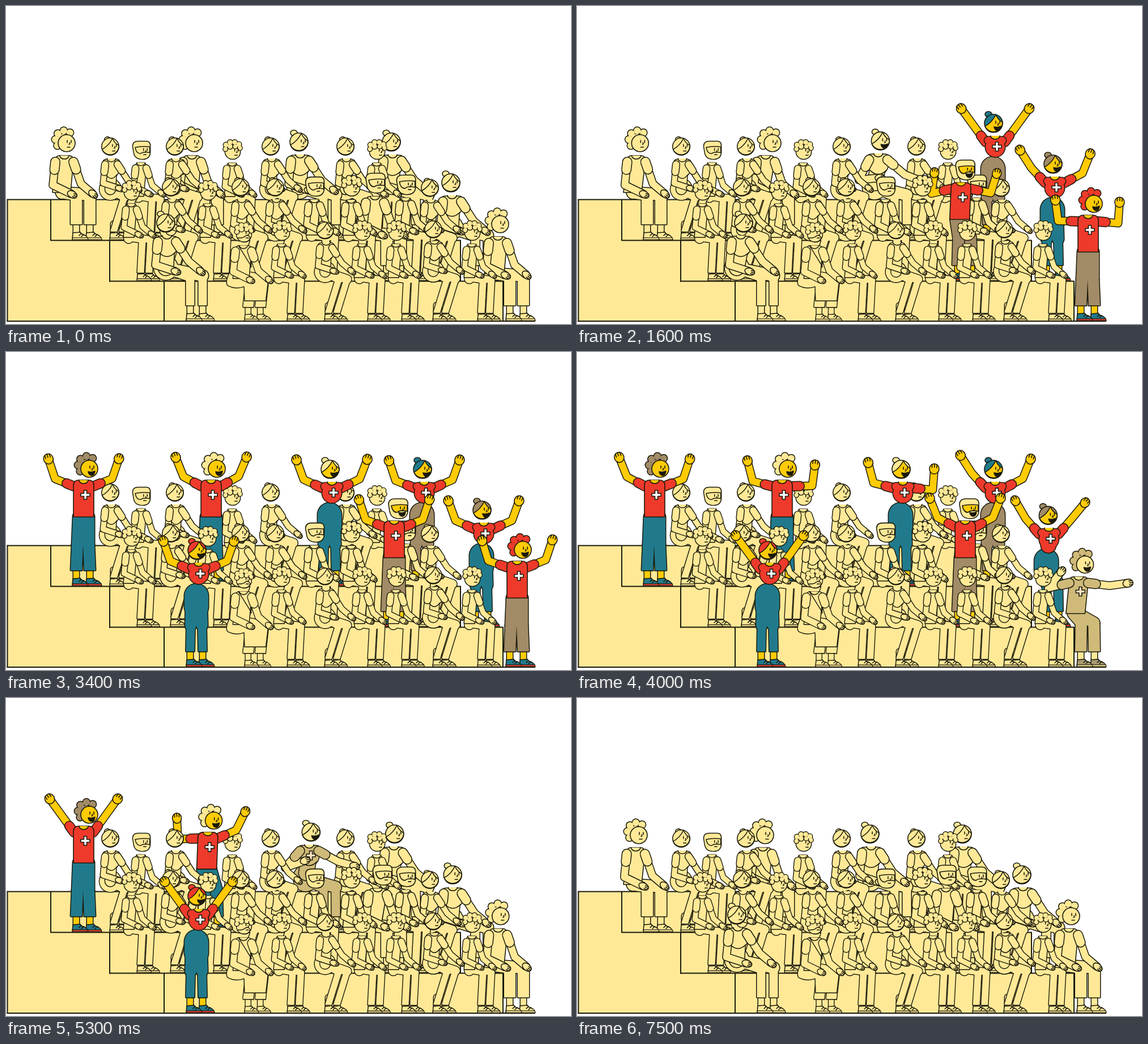
An HTML page with a canvas that plays this animation: 997x561 px, repeating every 7600 ms.

```html
<!DOCTYPE html>
<html lang="en">
<head>
<meta charset="utf-8">
<title>Cheering stand</title>
<style>
html, body { margin: 0; width: 100%; height: 100%; overflow: hidden; background: #fff; }
canvas { display: block; }
</style>
</head>
<body>
<canvas id="stage" width="997" height="561"></canvas>
<script>
const c = document.getElementById('stage').getContext('2d');
const INK = '#1b1a0c', PALE = '#ffe997', TAN = '#cfba79', GOLD = '#ffcb05';
const RED = '#ee3a2b', TEAL = '#217a8c', TAUPE = '#a28b67';
const LOOP = 7600, RISE = 700, SIT = 800;
const FLOORS = [413, 485, 556];
const BEATS = [1600, 2700, 4000, 5300];

// kind: b bun, c short curls, C big curls, g beard, r old man in a coat
const seated = [
  'b184,249 g239,255 b298,249 c400,256 b467,249 b599,249 c655,256',
  'c222,328 b291,321 c357,328 b414,321 b475,321 g545,319 c610,320 g706,316 b748,322',
  'r420,402 c487,399 b563,397 c629,399 c689,399 b754,395 c823,399'
].map(row => row.split(' ').map(s => {
  const [x, y] = s.slice(1).split(',').map(Number);
  return { kind: s[0], x, y };
}));

// arms: how far each arm is bent (0-9) at each beat, left and right
const fan = (row, kind, base, up, down, hair, pants, arms) =>
  ({ row, kind, base, up, down, hair, pants, arms, x: base - (kind === 'b' ? 53 : 31) });
const fans = [
  fan(0, 'C', 136, 1800, 5850, TAUPE, TEAL, ['0040', '0050']),
  fan(0, 'C', 361, 1600, 5070, PALE, TEAL, ['9968', '9984']),
  fan(0, 'b', 571, 1430, 4740, PALE, TEAL, ['3360', '3390']),
  fan(0, 'b', 734, 850, 3980, TEAL, TAUPE, ['0310', '0440']),
  fan(1, 'g', 684, 1130, 4450, PALE, TAUPE, ['9040', '9040']),
  fan(1, 'b', 839, 820, 3770, TAUPE, TEAL, ['1900', '4900']),
  fan(2, 'b', 336, 1600, 5400, RED, TEAL, ['8800', '8800']),
  fan(2, 'C', 901, 800, 3560, RED, TAUPE, ['8000', '9500'])
];
const rows = FLOORS.map((_, i) =>
  [...seated[i], ...fans.filter(f => f.row === i)].sort((a, b) => b.x - a.x));

const clamp = v => Math.max(0, Math.min(1, v));
const mix = (a, b, u) => a + (b - a) * u;
const smooth = v => { v = clamp(v); return v * v * (3 - 2 * v); };
const polar = ([x, y], deg, r) => {
  const a = deg * Math.PI / 180;
  return [x + r * Math.cos(a), y + r * Math.sin(a)];
};

function shape(d, fill) {
  const p = new Path2D(d);
  c.lineWidth = 1.6;
  c.strokeStyle = INK;
  if (fill) { c.fillStyle = fill; c.fill(p); }
  c.stroke(p);
}

function oval(x, y, rx, ry, fill, to = 2 * Math.PI) {
  c.beginPath();
  c.ellipse(x, y, rx, ry, 0, 0, to);
  c.lineWidth = 1.6;
  c.strokeStyle = INK;
  c.fillStyle = fill;
  c.fill();
  c.stroke();
}

// Merged thick lines with one outline; a negative width gives square ends
function limbs(fill, ...list) {
  for (const outer of [true, false]) {
    c.strokeStyle = outer ? INK : fill;
    for (const [w, ...p] of list) {
      c.lineCap = w < 0 ? 'butt' : 'round';
      c.lineWidth = Math.abs(w) + (outer ? 3 : 0);
      c.beginPath();
      c.moveTo(p[0], p[1]);
      for (let i = 0; i < p.length; i += 2) c.lineTo(p[i], p[i + 1]);
      c.stroke();
    }
  }
  c.lineCap = 'round';
}

function head(kind, x, y, hair, skin, happy, small) {
  c.save();
  c.translate(x, y);
  if (kind === 'b') {
    oval(small ? -5 : -9, small ? -13 : -16, 6, 5, hair);
    oval(0, 0, 16, 16, hair);
    shape('M-15 5Q-2-2 4-15.5Q8-6 15.8-2A16 16 0 0 1-15 5Z', skin);
  } else if (kind === 'g') {
    shape('M-17-8Q-17-18-6-18H9Q18-18 17-7V4Q16 17 2 17Q-13 17-15 4Z', hair);
    shape('M-12-6Q2-9 16-7V4Q4 1-2 6Q-10 6-12-6Z', skin);
  } else if (kind === 'C') {
    limbs(hair, ...[140, 182, 224, 266, 308].map(a => [12, ...polar([-1, -5], a, 16)]), [22, -3, -4]);
    oval(3, 1, 15, 15, skin);
  } else {
    oval(0, 1, 15, 15, skin);
    limbs(hair, [8, -14, -4], [9, -13, -12], [9, -5, -17], [9, 4, -17], [9, 12, -13], [8, 14, -6], [9, -5, -9], [8, 5, -9]);
    if (kind === 'r') shape('M-12 8Q-2 9 3 4Q10 1 12 8Q9 18-2 16');
  }
  shape('M4-4V0M11-4V0M8 0Q10 3 7 3');
  if (happy) shape('M1 6Q7 8 13 5Q12 13 7 13Q2 12 1 6Z', INK);
  else shape('M4 8H9');
  c.restore();
}

function shoe(x, fill, sole) {
  c.save();
  c.translate(x, -13);
  shape('M-6 0L-7 12H21Q20 5 9 2L7-1Z', fill);
  shape('M-7 9H20');
  c.fillStyle = sole;
  c.fillRect(-6, 9.5, 26, 2);
  shape('M5 5L9 1M9 7L13 3');
  c.restore();
}

function arm(s, a1, l1, a2, l2, skin, shirt, u, girth) {
  const e = polar(s, a1, l1), h = polar(e, a2, l2), cuff = polar(s, a1, 14);
  limbs(skin, [12 * girth, ...s, ...e, ...h]);
  limbs(shirt, [15 * girth, ...s, ...cuff]);
  c.save();
  c.translate(...h);
  c.rotate(a2 * Math.PI / 180);
  const r = mix(6, 8.5, u) * mix(1, girth, .5);
  oval(2, 0, 9, r, skin);
  shape(`M4-${r / 2}H10M5 0H11M4 ${r / 2}H10`);
  c.restore();
}

function cross(x, y, fill) {
  shape(`M${x - 2.5} ${y - 8}h5v5.5h5.5v5h-5.5v5.5h-5v-5.5h-5.5v-5h5.5Z`, fill);
}

// Local origin is the floor point under the standing body
function person({ kind, u = 0, lean = 0, hair, pants, bends = [0, 0], shift = 0, small = false }) {
  const woman = kind === 'b', slim = small ? woman ? .72 : .65 : 1, girth = small ? .8 : 1;
  const stage = u < .2 ? 0 : u < .5 ? 1 : 2;
  const tint = full => stage === 2 ? full : stage && full !== PALE ? TAN : PALE;
  const skin = stage === 2 ? GOLD : PALE;
  const shirt = tint(RED), cloth = tint(pants), hairFill = tint(hair);
  const rise = u ** 1.5, nod = lean * (1 - u);
  const at = (x0, y0, x1, y1, k = 0) => [mix(x0, x1, u) + k * nod, mix(y0, y1, rise)];

  const hd = woman ? at(-54, -173, 1, -206, 12) : at(-32, -172, 8, -208, 13);
  const top = woman ? at(-52, -151, 4, -184, 5) : at(-33, -149, 1, -187, 5);
  const hip = woman ? at(-54, -94, 0, -126) : at(-38, -84, 1, -122);
  const [tx, ty] = top, [hx, hy] = hip;

  // legs and shoes
  const cuff = small ? -15 : -27;
  const thigh = woman ? 20 * girth : 20 * slim, shin = woman ? 15 * girth : thigh;
  const gap = small ? 8 : woman ? 11 : 12;
  const feet = [gap, -gap].map(x => x + shift);
  for (const f of feet) {
    limbs(skin, [10, f, -30, f, -12]);
    shoe(f, stage === 2 ? TEAL : stage ? '#a69b72' : PALE, stage === 2 ? RED : PALE);
  }
  const legs = feet.flatMap((f, i) => {
    const side = i ? -1 : 1;
    const knee = at(side * gap + shift / 2, -80, side * 10, -74);
    return [[thigh, hx + side * 9 * u, hy + (woman ? 14 * u : 0), ...knee], [-shin, ...knee, f, cuff]];
  });
  limbs(cloth, ...legs, woman ? [42 * mix(1, girth, .3), hx, hy, hx, hy + 20 * u] : [18, hx, hy + 2]);
  for (const f of feet) shape(`M${f - shin / 2} ${cuff}h${shin}`);
  if (kind === 'r') shape('M-54-108Q-72-78-64-70Q-48-62-32-68L-31-40H11L15-74Q14-92-20-97Z', PALE);

  // arms go from lap to raised through the outside
  const lift = clamp(u * 1.2), reach = small ? .85 : 1;
  const drawArms = () => [1, 0].forEach(i => {
    const k = bends[i], e = mix(54, -5, k), f = mix(54, 86, k);
    const s = [tx + (i ? 1 : -1) * mix(16, 17, u) * slim, ty + 11];
    const a1 = i ? mix(woman ? 57 : 71, -e, lift) : mix(96, 180 + e, lift);
    const a2 = i ? mix(40, -f, lift) : mix(woman ? 18 : 26, f - 180, lift);
    const l1 = mix(41 * reach, 36, lift), l2 = mix((i ? 26 : 36) * reach, 35, lift);
    arm(s, a1, l1, a2, l2, skin, shirt, u, girth);
  });
  if (u > .5) drawArms();

  // torso
  if (woman) {
    const chest = ty + 20;
    limbs(shirt, [12, tx - 13 * slim, ty + 8, tx + 13 * slim, ty + 8], [34 * mix(1, slim, .6), tx, chest],
      [26 * slim, tx, chest, mix(hx, tx, u), mix(hy, chest + 4, u)]);
    if (u < .5) shape(`M${tx - 14 * slim} ${chest + 10}Q${tx} ${chest + 24} ${tx + 14 * slim} ${chest + 10}`);
  } else {
    const w = mix(16, 18, u) * slim, n = 8 * slim;
    shape(`M${hx - w} ${hy}L${tx - w} ${ty + 9}Q${tx - w} ${ty} ${tx - n} ${ty}H${tx + n}` +
      `Q${tx + w} ${ty} ${tx + w} ${ty + 9}L${hx + w} ${hy}Z`, shirt);
  }
  oval(tx, ty, 8, 6, skin, Math.PI);
  if (kind === 'r') shape(`M${tx - 10} ${ty}L${tx + 16} ${ty + 42}`);
  if (stage) cross(tx + 3, ty + (woman ? 19 : 26), stage === 2 ? '#fff' : '#fbe3c0');
  if (u <= .5) drawArms();
  head(kind, ...hd, hairFill, skin, u > .08, small);
}

function pose(f, t) {
  const early = t < (f.up + f.down) / 2;
  const u = early ? smooth((t - f.up) / RISE) : 1 - smooth((t - f.down) / SIT);
  const lean = early ? clamp((t - f.up) / 300 + 1) : clamp(1 - (t - f.down - SIT) / 1000);
  const i = t < BEATS[1] ? 0 : t < BEATS[2] ? 1 : 2;
  const n = (t - BEATS[i]) / (BEATS[i + 1] - BEATS[i]);
  const wave = .6 * Math.sin(Math.PI * n) ** 2;
  const bends = f.arms.map(s => {
    const m = mix(+s[i], +s[i + 1], clamp(n)) / 9;
    return m + (1 - 2 * m) * wave;
  });
  return { ...f, u, lean, bends };
}

function stand() {
  c.fillStyle = PALE;
  c.strokeStyle = INK;
  c.lineWidth = 2;
  for (const [x, y, right] of [[2.5, 341.5, 727], [79, 413.5, 802], [183, 485.5, 877]]) {
    c.fillRect(x, y, right - x, 556 - y);
    c.beginPath();
    c.moveTo(x, y);
    c.lineTo(right, y);
    c.lineTo(right, 556);
    c.stroke();
  }
  c.beginPath();
  for (const [x, y, h] of [[2.5, 341.5, 214], [79, 342, 71], [183, 414, 72], [279, 486, 70]]) {
    c.moveTo(x, y);
    c.lineTo(x, y + h);
  }
  c.moveTo(2, 556);
  c.lineTo(933, 556);
  c.stroke();
}

function draw(t) {
  c.clearRect(0, 0, 997, 561);
  c.lineJoin = c.lineCap = 'round';
  stand();
  rows.forEach((row, i) => row.forEach(p => {
    c.save();
    if (p.base) {
      c.translate(p.base, FLOORS[i]);
      person(pose(p, t));
    } else {
      const woman = p.kind === 'b', size = (FLOORS[i] - p.y) / 172;
      c.translate(p.x + (woman ? 54 : 32) * size, FLOORS[i]);
      c.scale(size, size);
      person({
        kind: p.kind, hair: PALE, pants: PALE, small: p.kind !== 'r',
        shift: woman ? -40 : p.kind === 'r' ? -12 : -7
      });
    }
    c.restore();
  }));
}

const start = performance.now();
function tick() {
  const t = Math.max(0, performance.now() - start) % LOOP;
  draw(Math.floor(t / 100) * 100);
  requestAnimationFrame(tick);
}
tick();
</script>
</body>
</html>
```
